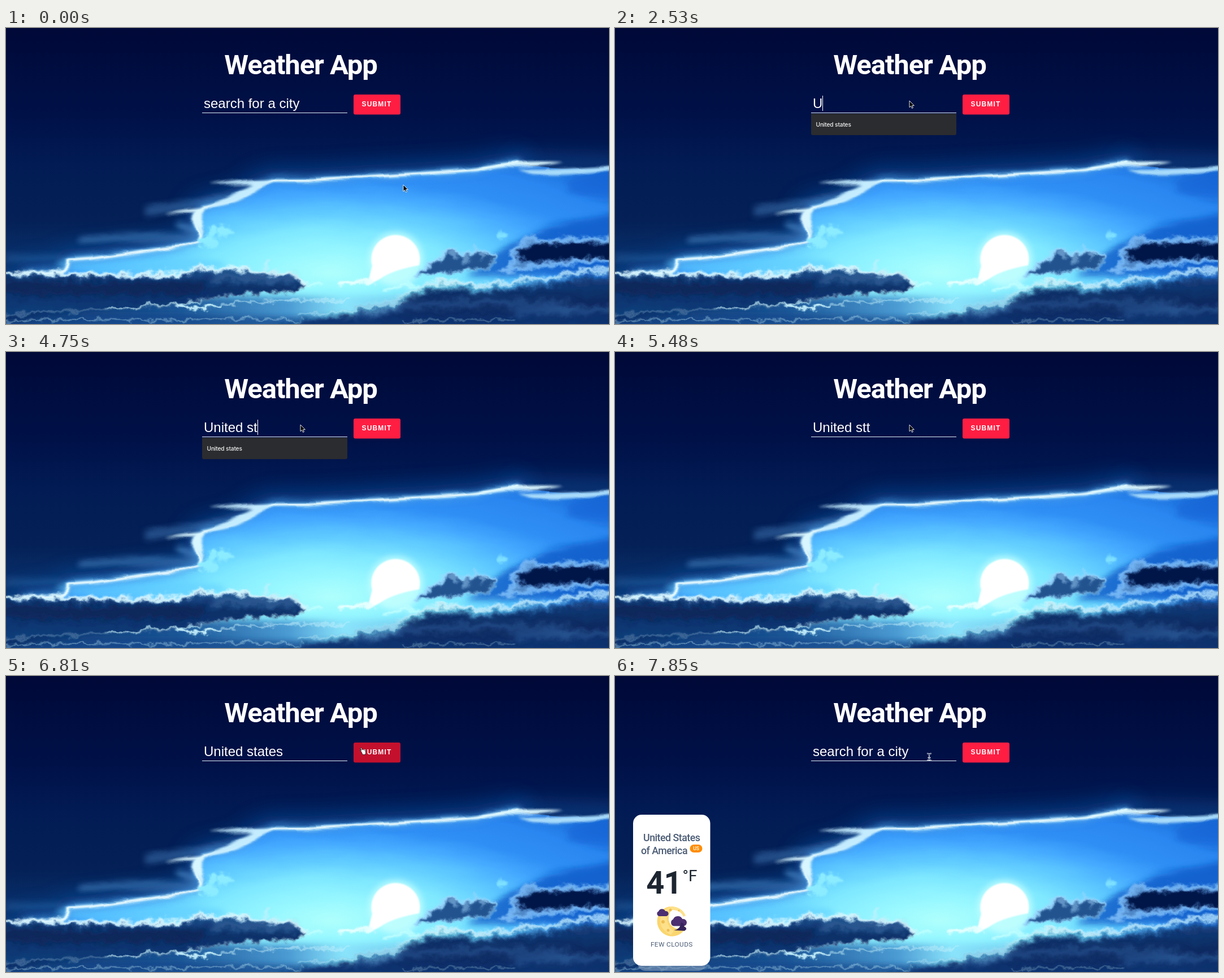
Animation, 1067 px wide and 525 px high, one loop 8000 ms. Source, as an HTML page:

```html
<!DOCTYPE html>
<html lang="en">
<head>
<meta charset="utf-8">
<title>Weather App</title>
<style>
html, body { margin: 0; width: 100%; height: 100%; overflow: hidden; background: #000a3c; }
svg { position: absolute; left: 0; top: 0; width: 100%; height: 100%; }
#sky { will-change: transform; }
.line { fill: none; stroke-linecap: round; stroke-linejoin: round; }
.rim { stroke: #dcf8ff; stroke-width: 7; stroke-linejoin: round; fill: #8cc8f0; filter: url(#b2); }
.body { filter: url(#b2); }
.field { font: 24px "Liberation Sans", Arial, sans-serif; fill: #fff; white-space: pre; }
.sub { font: 700 12px "Liberation Sans", Arial, sans-serif; letter-spacing: 1.15px; fill: #fff; }
.card { font-family: Roboto, sans-serif; text-anchor: middle; fill: #4b5c75; }
.place { font-size: 17.8px; font-weight: 500; letter-spacing: -.5px; }
</style>
</head>
<body>
<svg id="sky" viewBox="0 0 1067 525">
  <defs>
    <linearGradient id="night" x2="0" y2="1">
      <stop offset="0" stop-color="#000938"/><stop offset=".3" stop-color="#001148"/>
      <stop offset=".46" stop-color="#021b54"/><stop offset=".65" stop-color="#042056"/>
      <stop offset=".85" stop-color="#0c3a78"/>
    </linearGradient>
    <radialGradient id="day" gradientUnits="userSpaceOnUse" cx="0" cy="0" r="260" gradientTransform="translate(575 432) scale(3 1)">
      <stop offset="0" stop-color="#aefffc"/><stop offset=".13" stop-color="#98f8ff"/>
      <stop offset=".28" stop-color="#7fe8ff"/><stop offset=".4" stop-color="#60cbff"/>
      <stop offset=".52" stop-color="#44a9ff"/><stop offset=".62" stop-color="#2f8ff5"/>
      <stop offset=".76" stop-color="#2a86f0"/><stop offset="1" stop-color="#0c58c4"/>
    </radialGradient>
    <linearGradient id="low">
      <stop offset="0" stop-color="#0a2c64"/><stop offset=".28" stop-color="#1b5596"/>
      <stop offset=".47" stop-color="#4c9cd4"/><stop offset=".56" stop-color="#8ae4fb"/>
      <stop offset="1" stop-color="#2a78c8"/>
    </linearGradient>
    <linearGradient id="shade" x2="0" y2="1">
      <stop offset="0" stop-color="#1d4f8c"/><stop offset=".4" stop-color="#0c2f68"/>
      <stop offset="1" stop-color="#123f7c"/>
    </linearGradient>
    <linearGradient id="deep" x2="0" y2="1">
      <stop offset="0" stop-color="#163f7c"/><stop offset=".4" stop-color="#08265c"/>
      <stop offset="1" stop-color="#0f458e"/>
    </linearGradient>
    <linearGradient id="fade">
      <stop offset=".3" stop-color="#c8f8ff" stop-opacity="0"/><stop offset=".55" stop-color="#d4faff"/>
      <stop offset="1" stop-color="#a8dcff"/>
    </linearGradient>
    <filter id="b1" filterUnits="userSpaceOnUse" x="-40" y="-40" width="1150" height="610"><feGaussianBlur stdDeviation=".9"/></filter>
    <filter id="b2" filterUnits="userSpaceOnUse" x="-40" y="-40" width="1150" height="610"><feGaussianBlur stdDeviation="2"/></filter>
    <filter id="b6" filterUnits="userSpaceOnUse" x="-40" y="-40" width="1150" height="610"><feGaussianBlur stdDeviation="6"/></filter>
    <filter id="b20" filterUnits="userSpaceOnUse" x="-80" y="-40" width="1230" height="650"><feGaussianBlur stdDeviation="18"/></filter>
    <filter id="rough" filterUnits="userSpaceOnUse" x="-40" y="-40" width="1150" height="610" color-interpolation-filters="sRGB">
      <feTurbulence type="fractalNoise" baseFrequency=".05 .06" numOctaves="4" seed="7"/>
      <feDisplacementMap in="SourceGraphic" scale="20" xChannelSelector="R" yChannelSelector="G"/>
    </filter>
    <filter id="wisp" filterUnits="userSpaceOnUse" x="-40" y="-40" width="1150" height="610" color-interpolation-filters="sRGB">
      <feTurbulence type="fractalNoise" baseFrequency=".012 .04" numOctaves="3" seed="3"/>
      <feDisplacementMap in="SourceGraphic" scale="10" xChannelSelector="R" yChannelSelector="G"/>
    </filter>
    <path id="edge" d="M905 240Q870 242 835 252Q760 258 680 262T540 270L470 270Q450 276 440 283Q425 300 385 311L347 319Q333 335 337 352Q345 368 345 376Q335 386 280 391L215 401L150 410L110 413Q112 428 98 432L35 435"/>
    <path id="left" d="M-20 437L50 434L110 437L200 438L270 437L322 434L343 423L372 431L402 425L428 433L462 436L500 435L530 450L516 461L470 465L400 470L340 480L290 489L180 494L-20 506Z"/>
    <path id="mid" d="M728 437L750 416L768 408L785 391L808 403L836 392L866 408L852 424L812 428L772 434Z"/>
    <path id="right" d="M878 430L905 412L892 394L914 388L924 370L955 379L1000 372L1090 376V410L1010 414L950 422L905 428Z"/>
    <path id="base" d="M380 560L520 512L620 497L685 486L716 466L755 452L800 450L832 457L880 453L930 444L965 444L1005 433L1090 430V560Z"/>
  </defs>

  <rect width="1067" height="525" fill="url(#night)"/>
  <use href="#edge" class="line" stroke="#0e4c98" stroke-width="42" opacity=".75" filter="url(#b20)"/>
  <path class="line" d="M905 240L1090 246" stroke="#1c5eae" stroke-width="24" opacity=".6" filter="url(#b20)"/>

  <g filter="url(#wisp)">
    <path d="M1090 248L985 250L885 242L835 254L680 264L540 272L470 272L440 285Q425 302 385 313L347 321Q333 335 337 352L345 378Q335 388 280 393L150 412L110 415L98 434L30 437V545H1090Z" fill="url(#day)"/>
    <path d="M1090 325L960 352L890 385L815 440H1090Z" fill="#0b58c6" opacity=".8" filter="url(#b6)"/>
    <ellipse cx="240" cy="421" rx="150" ry="17" fill="#62d0ff" opacity=".6" filter="url(#b6)"/>
    <ellipse cx="1065" cy="280" rx="75" ry="22" fill="#1264d6" opacity=".7" filter="url(#b6)"/>
  </g>

  <g filter="url(#wisp)">
    <g class="line" stroke="#4a86c4" filter="url(#b6)" opacity=".7">
      <path d="M135 376Q230 368 335 375" stroke-width="11"/>
      <path d="M250 325L335 312L420 290" stroke-width="10"/>
      <path d="M310 350L335 362" stroke-width="16"/>
      <path d="M0 407L100 408" stroke-width="8" opacity=".6"/>
    </g>
    <use href="#edge" class="line" stroke="#4c9ee8" stroke-width="12" opacity=".85" filter="url(#b6)"/>
    <use href="#edge" class="line" stroke="#a9e2ff" stroke-width="6" filter="url(#b2)"/>
    <use href="#edge" class="line" stroke="#f4ffff" stroke-width="3" filter="url(#b1)"/>
    <path d="M820 255Q875 233 985 239Q930 250 885 246Z" fill="#dcf8ff" filter="url(#b2)"/>
    <path d="M905 251Q960 253 1080 244V252Q990 266 930 260Z" fill="#a9dcfa" filter="url(#b2)"/>
    <path d="M360 278Q415 267 475 269Q450 281 425 300Q400 313 348 321Q388 300 436 277Z" fill="#c4ecff" filter="url(#b2)"/>
    <path d="M282 328Q320 320 350 318L347 376L336 386Q352 368 336 352Q324 340 336 327Z" fill="#d8f6ff" filter="url(#b2)"/>
  </g>
  <g filter="url(#rough)" >
    <g fill="#8cecff" filter="url(#b2)">
      <circle cx="387" cy="360" r="12"/><circle cx="365" cy="361" r="9"/>
      <ellipse cx="358" cy="379" rx="17" ry="10"/><ellipse cx="878" cy="370" rx="9" ry="8" opacity=".75"/>
    </g>
  </g>

  <circle cx="690" cy="410" r="48" fill="#c8fffe" opacity=".8" filter="url(#b6)"/>
  <path d="M640 455Q643 440 648 422A43 43 0 1 1 731 421Q690 428 668 441Q655 450 640 455Z" fill="#fff" filter="url(#b1)"/>

  <rect y="476" width="1067" height="60" fill="url(#low)" filter="url(#b6)"/>
  <path d="M-20 522L150 508L330 508L560 514L720 510V545H-20Z" fill="#144a8c" opacity=".75" filter="url(#b6)"/>
  <g filter="url(#rough)">
    <g class="line" stroke="#e9ffff" filter="url(#b2)">
      <path d="M594 453L650 449" stroke-width="8"/>
      <path d="M455 437L463 412" stroke-width="8" stroke="#b4f2ff"/>
      <path d="M520 456L560 457M670 463L730 455" stroke-width="5" stroke="#c4ffff"/>
    </g>
    <use href="#left" class="rim"/>
    <use href="#left" class="body" fill="url(#shade)" y="4"/>
    <g filter="url(#b6)" class="line">
      <path d="M370 443L440 445L510 447" stroke="#4878ac" stroke-width="10" opacity=".65"/>
      <path d="M-10 459L180 463L340 460" stroke="#08255a" stroke-width="22"/>
    </g>
    <use href="#mid" class="rim" style="stroke:#9cd8ff"/>
    <use href="#mid" class="body" fill="#24538f" transform="translate(13 8) scale(.985)"/>
    <g filter="url(#b2)" fill="#86b8e4" opacity=".65">
      <circle cx="790" cy="403" r="8"/><circle cx="815" cy="410" r="7"/><circle cx="842" cy="404" r="8"/>
    </g>
    <use href="#right" class="rim" style="stroke:#75b6f4;fill:#4f88c8"/>
    <path class="body" d="M922 414L904 400L932 384L1000 380L1090 385V406L990 410L930 417Z" fill="#03174a"/>
    <use href="#base" class="rim" style="stroke:url(#fade);fill:none"/>
    <use href="#base" filter="url(#b6)" fill="url(#deep)" y="9"/>
  </g>
  <g filter="url(#rough)" class="line">
    <g filter="url(#b1)" stroke="#ccf6ff">
      <path d="M180 497L300 490L345 486" stroke-width="2"/>
      <path d="M302 493L335 497L378 493" stroke-width="4"/>
      <path d="M375 490L470 484L610 482" stroke-width="3" opacity=".6"/>
      <path d="M-10 520L120 517L250 518L430 515L520 519" stroke-width="2" opacity=".6"/>
      <path d="M520 508L620 500L700 487" stroke-width="2" opacity=".6"/>
      <path d="M700 520L800 517L900 519" stroke-width="2" opacity=".4"/>
    </g>
    <g filter="url(#b6)" stroke="#3c7cbc" stroke-width="9" opacity=".6">
      <path d="M620 512L720 492L860 487L1000 492"/>
      <path d="M900 505L1080 500"/>
    </g>
  </g>
</svg>

<svg id="ui" viewBox="0 0 1067 525">
  <text x="521.5" y="82" text-anchor="middle" fill="#fff" style="font:700 49px Roboto,sans-serif;letter-spacing:-1.1px">Weather App</text>
  <text id="field" class="field" x="350" y="142" xml:space="preserve">search for a city</text>
  <rect x="347" y="150" width="257" height="1" fill="#e8ecf6"/>
  <rect id="caret" x="350" y="120" width="1" height="27" fill="#fff"/>
  <rect id="btn" x="615" y="118" width="83" height="35.5" rx="3" fill="#ff1e42"/>
  <text class="sub" x="629.5" y="139.3">SUBMIT</text>

  <g id="drop">
    <path d="M347 152H604V187Q604 190 601 190H350Q347 190 347 187Z" fill="#2b2c2f"/>
    <text x="355.5" y="174.6" fill="#f4f4f4" style="font:500 10.2px Inter,sans-serif;letter-spacing:-.15px">United states</text>
  </g>

  <g id="card" class="card">
    <rect x="40" y="490" width="121" height="33" rx="14" fill="#7f9ab8" opacity=".65"/>
    <rect x="32" y="246" width="136.5" height="268" rx="15" fill="#fff"/>
    <text class="place" x="100.3" y="293">United States</text>
    <text class="place" x="87" y="315.5">of America</text>
    <rect x="132.5" y="299" width="22" height="14" rx="7" fill="#ff8c00"/>
    <text x="143.5" y="309.3" style="font-size:8.5px;font-weight:500;fill:#fff">US</text>
    <text x="86.5" y="385.5" style="font-size:56px;font-weight:700;letter-spacing:-1px;fill:#1c2530">41</text>
    <text x="132.5" y="364" style="font-size:28px;fill:#1c2530">°F</text>
    <path d="M105 409A26.5 26.5 0 1 0 126 444A19 19 0 0 1 95 432Q94 418 105 409Z" fill="#fbd66e"/>
    <path d="M101 409A26 26 0 0 1 125 425L121 427Q116 415 101 415Q90 420 92 434Q94 446 104 452L99 459Q80 451 80 432Q82 413 101 409Z" fill="#fde08a"/>
    <g fill="#f0bd52"><circle cx="98" cy="415" r="2.5"/><circle cx="85" cy="436" r="3"/><circle cx="94" cy="451" r="2.5"/><circle cx="113" cy="416" r="1.6"/></g>
    <path id="puff" d="M78 426A4.5 4.5 0 0 1 77 417.5A6.5 6.5 0 0 1 89 417A4.6 4.6 0 0 1 91 426Z" fill="#4b2f70"/>
    <use href="#puff" transform="translate(-3.5 -148.5) scale(1.38)" y="3"/>
    <path d="M104 451Q116 449 117 437Q124 440 122 444Q130 448 123 452Z" fill="#35235a"/>
    <text x="100.3" y="480.3" style="font-size:11.8px;letter-spacing:.4px">FEW CLOUDS</text>
  </g>

  <g id="arrow"><path d="M0 0V11.8L2.7 9.3L4.5 13.4L6.4 12.5L4.7 8.6H8.3Z" fill="#000" stroke="#fff" stroke-width=".9"/></g>
  <g id="hand"><path d="M2.5 7L.7 4.7Q1.5 3.5 3 5L1.2 1Q2 -.6 3.2 .8L4.7 4Q6 2.8 6.7 4Q8 3 8.6 4.5Q10 4.2 10.3 6L10.5 9L9.5 12.5H5.2Z" fill="#fff" stroke="#111" stroke-width=".8"/></g>
  <g id="beam" class="line">
    <path d="M-3 -6Q0 -6 0 -3.5Q0 -6 3 -6M0 -3.5V3.5M-3 6Q0 6 0 3.5Q0 6 3 6M-1.5 1.5H1.5" stroke="#e8edf5" stroke-width="2.2"/>
    <path d="M-3 -6Q0 -6 0 -3.5Q0 -6 3 -6M0 -3.5V3.5M-3 6Q0 6 0 3.5Q0 6 3 6" stroke="#1a2748" stroke-width=".8"/>
  </g>
</svg>

<script>
const $ = id => document.getElementById(id);
const LOOP = 8000, HINT = 'search for a city', CITY = 'United states';
const show = (id, on) => $(id).style.display = on ? '' : 'none';
const at = (list, t) => list.reduce((found, step) => step[0] <= t ? step : found);

// time, typed text
const typing = [
  [0, ''], [2530, 'U'], [2830, 'Un'], [3120, 'Uni'], [3270, 'Unit'], [3410, 'Unite'],
  [3560, 'United'], [3710, 'United '], [4600, 'United s'], [4750, 'United st'],
  [5040, 'United stt'], [5630, 'United st'], [5780, 'United stat'], [5920, 'United state'],
  [6070, CITY], [6960, '']
];
// time, visible
const blink = [[0, 0], [1190, 1], [1630, 0], [2080, 1], [4310, 0], [4600, 1], [5480, 0], [5630, 1], [6660, 0]];
const menu = [[0, 0], [2530, 1], [5040, 0], [5630, 1], [6070, 0]];
// time, x, y, pointer
const mouse = [
  [0, 703, 278, 'arrow'], [600, 686, 258, 'arrow'], [750, 632, 206, 'arrow'],
  [890, 568, 160, 'arrow'], [1040, 532, 138, 'beam'], [1190, 522, 133, 'beam'],
  [2530, 521, 129, 'arrow'], [6360, 560, 108, 'arrow'], [6510, 602, 87, 'arrow'],
  [6660, 626, 127, 'hand'], [7260, 634, 135, 'hand'], [7410, 640, 205, 'arrow'],
  [7560, 610, 186, 'arrow'], [7700, 574, 158, 'arrow'], [7850, 556, 143.5, 'beam']
];
// time, button colour
const tint = [[0, '#ff1e42'], [6660, '#c3112d'], [7410, '#e01838'], [7560, '#ff1e42']];

const start = performance.now();
let last = '';

function draw(t) {
  const text = at(typing, t)[1], [, x, y, pointer] = at(mouse, t);
  const caret = at(blink, t)[1], open = at(menu, t)[1], color = at(tint, t)[1];
  const state = [text, x, y, caret, open, color].join();
  if (state === last) return;
  last = state;
  const field = $('field');
  field.textContent = text || HINT;
  const width = text ? field.getComputedTextLength() : 0;
  $('caret').setAttribute('x', Math.floor(350.3 + width));
  show('caret', caret);
  show('drop', open);
  show('card', t >= 6960);
  $('btn').setAttribute('fill', color);
  for (const id of ['arrow', 'hand', 'beam']) show(id, id === pointer);
  $(pointer).setAttribute('transform', `translate(${x} ${y})`);
}

function loop() {
  draw((performance.now() - start) % LOOP);
  requestAnimationFrame(loop);
}
loop();
</script>
</body>
</html>
```
